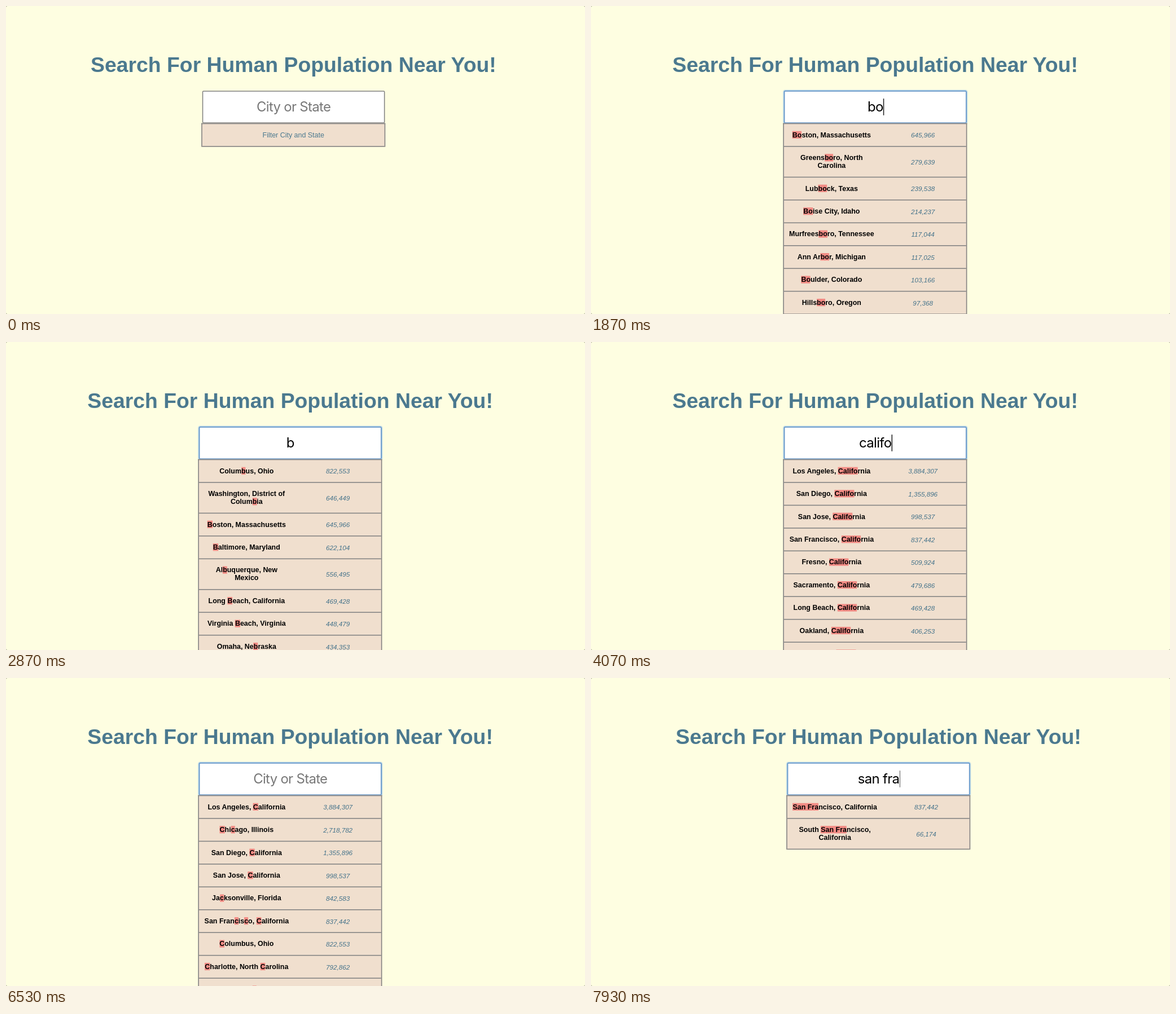
Animation, 1026 px wide and 546 px high, one loop 8 s. Source, as an HTML page:

```html
<!DOCTYPE html>
<html lang="en">
<head>
<meta charset="utf-8">
<title>Population search</title>
<style>
  html, body { margin: 0; width: 100%; height: 100%; overflow: hidden; background: #a5a594; }
  #stage { position: relative; width: 1026px; height: 546px; overflow: hidden; border-radius: 3px; background: #fefee1; }
  /* The page is laid out at its own size and shown smaller. */
  #page {
    position: absolute; left: 0; top: 0; width: 1319px; height: 702px;
    transform-origin: 0 0; transform: translateX(var(--shift, 0px)) scale(.778);
    font: 16px/18px "Liberation Sans", Arial, sans-serif; color: #4b798f;
  }
  h1 {
    position: absolute; left: 0; top: 106px; width: 1309.5px; margin: 0;
    font-size: 48px; line-height: 56px; text-align: center; white-space: nowrap;
  }
  #box {
    position: absolute; left: 447px; top: 193px; width: 416px; height: 73.5px; box-sizing: border-box;
    border: 2px solid #828282; border-radius: 3px; background: #fff; color: #000;
    font: 30.8px/69.5px Inter, "Open Sans", sans-serif; font-optical-sizing: none;
    letter-spacing: -.9px; text-align: center; white-space: pre;
  }
  #box.focus { border-color: #6796c6; box-shadow: 0 0 2px 1.5px #8fbde6; }
  #box.empty { color: #787878; }
  #caret { position: absolute; top: 16px; width: 1.3px; height: 38px; margin-left: .5px; background: #222; }
  #list {
    position: absolute; left: 445px; top: 266.6px; width: 419px; margin: 0; padding: 0;
    box-sizing: border-box; border: 2px solid #828282; border-bottom: 0; background: #f0dfce; list-style: none;
  }
  li {
    display: grid; grid-template-columns: 197px 219px; align-items: center;
    padding: 16px 0 16px 10px; border-bottom: 2px solid #828282; text-align: center;
  }
  li.hint { display: block; padding-left: 0; }
  b { color: #000; }
  i { position: relative; top: 1px; font-size: 15px; color: #43728a; }
  mark { background: #f28b84; color: inherit; }
</style>
</head>
<body>
<div id="stage">
  <div id="page">
    <h1>Search For Human Population Near You!</h1>
    <div id="box"></div>
    <ul id="list"></ul>
  </div>
</div>
<script>
const LOOP = 8000, FOCUS = 600, GAP = 133, LAG = 65, BLINK = 500;
const SCROLL_SHIFT = '-5.84px';

const places = `New York, New York 8405837
Los Angeles, California 3884307
Chicago, Illinois 2718782
Houston, Texas 2195914
Philadelphia, Pennsylvania 1553165
Phoenix, Arizona 1513367
San Antonio, Texas 1409019
San Diego, California 1355896
Dallas, Texas 1257676
San Jose, California 998537
Jacksonville, Florida 842583
San Francisco, California 837442
Columbus, Ohio 822553
Charlotte, North Carolina 792862
Detroit, Michigan 688701
Washington, District of Columbia 646449
Boston, Massachusetts 645966
Baltimore, Maryland 622104
Albuquerque, New Mexico 556495
Fresno, California 509924
Sacramento, California 479686
Long Beach, California 469428
Kansas City, Missouri 467007
Mesa, Arizona 457587
Virginia Beach, Virginia 448479
Omaha, Nebraska 434353
Oakland, California 406253
Tulsa, Oklahoma 398121
Wichita, Kansas 386552
Bakersfield, California 363630
Santa Ana, California 334227
Greensboro, North Carolina 279639
Lubbock, Texas 239538
Boise City, Idaho 214237
San Bernardino, California 213708
Santa Clarita, California 179590
Santa Rosa, California 171990
Murfreesboro, Tennessee 117044
Ann Arbor, Michigan 117025
San Buenaventura, California 108817
Boulder, Colorado 103166
San Mateo, California 101128
San Angelo, Texas 97492
Hillsboro, Oregon 97368
San Marcos, California 89387
San Leandro, California 87965
Bolingbrook, Illinois 73936
Bossier City, Louisiana 66333
South San Francisco, California 66174`.split('\n').map(line => {
  const cut = line.lastIndexOf(' ');
  return { name: line.slice(0, cut), count: Number(line.slice(cut)).toLocaleString('en-US') };
});

// Key presses: when, resulting text, and whether the key added a letter.
const keys = [{ at: FOCUS, text: '', typed: true }];
let draft = '';
function type(at, letters) {
  [...letters].forEach((letter, n) => keys.push({ at: at + n * GAP, text: draft += letter, typed: true }));
}
function erase(at) {
  for (; draft; at += GAP) keys.push({ at, text: draft = draft.slice(0, -1), typed: false });
}
type(1600, 'bo');
type(1930, 'sto');
erase(2400);
type(3330, 'california');
erase(5330);
type(7060, 'san fra');

const page = document.getElementById('page');
const box = document.getElementById('box');
const list = document.getElementById('list');
const lastKey = t => keys.filter(key => key.at <= t).pop();

function drawBox(key, caret) {
  const text = key ? key.text : '';
  const bar = caret ? '<span id="caret"></span>' : '';
  box.className = (key ? 'focus ' : '') + (text ? '' : 'empty');
  box.innerHTML = text ? text + bar : 'City or State' + bar;
  if (caret && !text) box.lastChild.style.left = '50%';
}

function drawList(query) {
  if (query === null) {
    list.innerHTML = '<li class="hint">Filter City and State</li>';
  } else {
    const match = new RegExp(query, 'gi');
    const label = name => query ? name.replace(match, '<mark>$&</mark>') : name;
    list.innerHTML = places
      .filter(place => place.name.search(match) >= 0)
      .map(place => `<li><b>${label(place.name)}</b><i>${place.count}</i></li>`)
      .join('');
  }
  const scrolls = list.offsetTop + list.offsetHeight > page.offsetHeight;
  page.style.setProperty('--shift', scrolls ? SCROLL_SHIFT : '0px');
}

let shownBox, shownQuery;
function frame() {
  const t = performance.now() % LOOP;
  const key = lastKey(t);
  const caret = !!key && key.typed && (t - key.at) % (2 * BLINK) < BLINK;
  const state = key ? key.at + ':' + caret : 'idle';
  if (state !== shownBox) {
    shownBox = state;
    drawBox(key, caret);
  }
  const heard = lastKey(t - LAG);
  const query = heard && heard !== keys[0] ? heard.text : null;
  if (query !== shownQuery) {
    shownQuery = query;
    drawList(query);
  }
  requestAnimationFrame(frame);
}
frame();
</script>
</body>
</html>
```
